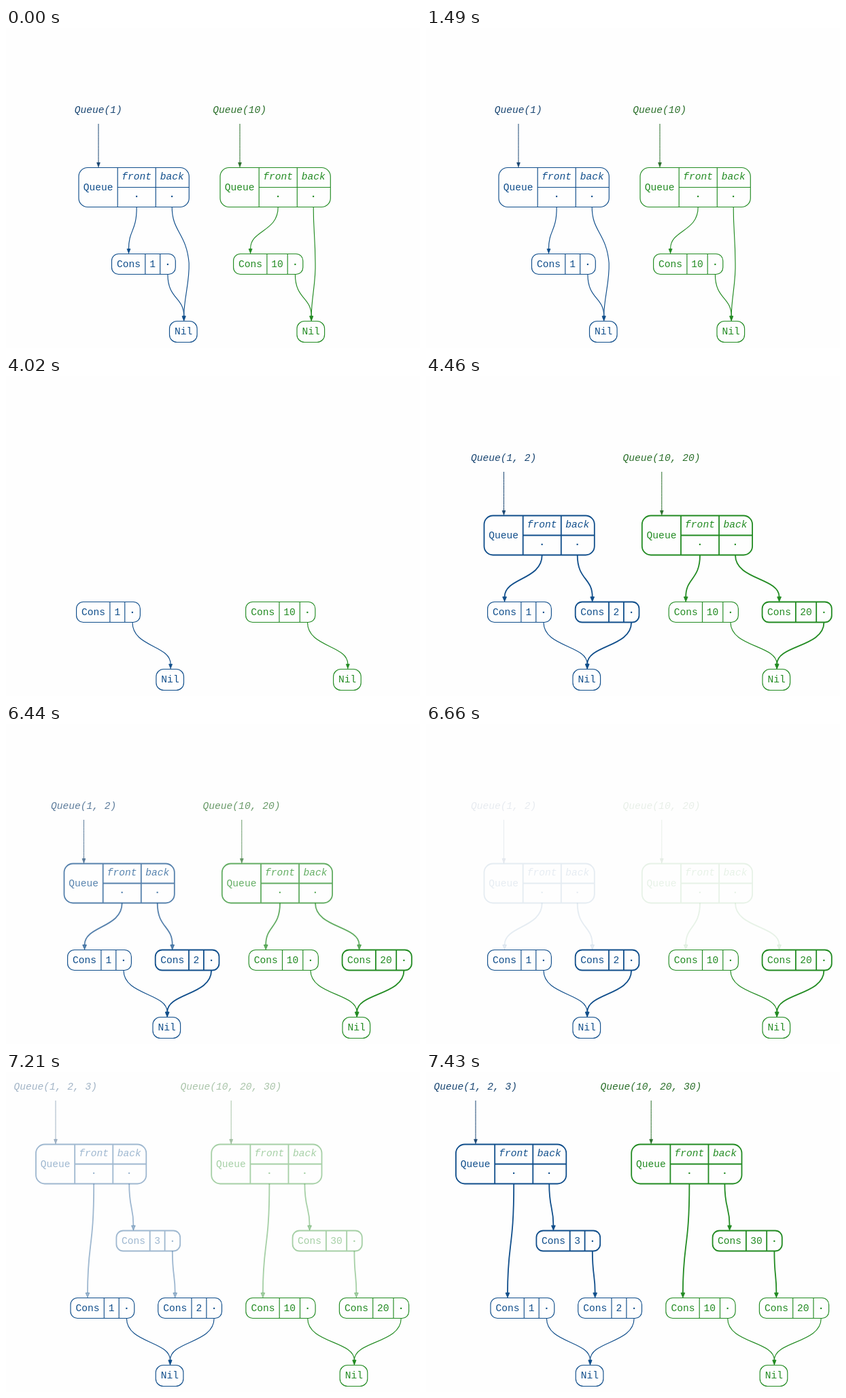
Write an HTML page with a canvas that moves like this. It is 609x471 px and loops after 8 s.

```html
<!DOCTYPE html>
<html lang="en">
<head>
<meta charset="utf-8">
<title>Queue diagram</title>
<style>
  html, body { margin: 0; height: 100%; overflow: hidden; background: #fefefe; }
  canvas { display: block; }
</style>
</head>
<body>
<canvas id="stage" width="609" height="471"></canvas>
<script>
const ctx = document.getElementById("stage").getContext("2d");
const THIN = 1.15, BOLD = 1.8;
const LOOP = 8000, STARTS = [3470, 6440], STEP = 110;
const QUEUE_TOPS = [205.5, 205.5, 106.5];

// Left edges of every box in the three successive layouts.
const graphs = [
  { color: "#104e8b", labelColor: "#1a4672", unit: 1, layouts: [
    { queue: 107, nil: 240.5, cons: [155.5] },
    { queue: 85.5, nil: 216, cons: [90.6, 219.7] },
    { queue: 44, nil: 220.3, cons: [95, 223.7, 162.4] } ] },
  { color: "#228b22", labelColor: "#2a6f2a", unit: 10, layouts: [
    { queue: 315, nil: 428, cons: [334.6] },
    { queue: 317.8, nil: 495, cons: [357.2, 494.6] },
    { queue: 302.2, nil: 491.2, cons: [352.9, 490.4, 421.6] } ] }
];

const clamp = v => Math.max(0, Math.min(1, v));
const lerp = (a, b, t) => a + (b - a) * t;
const consTop = i => i < 2 ? 332.5 : 233.5;

function setColor(color) {
  ctx.strokeStyle = ctx.fillStyle = color;
}

function text(str, x, y, style = "") {
  ctx.font = `${style} 14.6px "Liberation Mono", monospace`;
  ctx.fillText(str, x, y);
}

const dot = (x, y) => text("·", x, y, "bold");

function box(x, y, w, h, r, lines = []) {
  ctx.beginPath();
  ctx.roundRect(x, y, w, h, r);
  for (const [x1, y1, x2, y2] of lines) {
    ctx.moveTo(x + x1, y + y1);
    ctx.lineTo(x + x2, y + y2);
  }
  ctx.stroke();
}

// Curve through groups of bezier points, ending in a downward arrowhead.
function arrow(x, y, ...curves) {
  const [endX, endY] = curves.at(-1).slice(-2);
  ctx.beginPath();
  ctx.moveTo(x, y);
  for (const c of curves) ctx.bezierCurveTo(...c);
  ctx.stroke();
  const half = 2 + ctx.lineWidth / 2;
  ctx.beginPath();
  ctx.moveTo(endX - half, endY);
  ctx.lineTo(endX + half, endY);
  ctx.lineTo(endX, endY + 7);
  ctx.closePath();
  ctx.fill();
  ctx.lineWidth /= 2;
  ctx.stroke();
  ctx.lineWidth *= 2;
}

function edge(x1, y1, x2, y2) {
  const end = y2 - 7.5, dy = end - y1;
  arrow(x1, y1, [x1, y1 + dy * 0.6, x2, end - dy * 0.46, x2, end]);
}

function drawCons(graph, i, x, nil, cons, width) {
  const y = consTop(i), wide = graph.unit > 1 ? 8.4 : 0;
  ctx.lineWidth = width;
  box(x, y, 93.8 + wide, 30, 10, [[49.3, 0, 49.3, 30], [71.2 + wide, 0, 71.2 + wide, 30]]);
  text("Cons", x + 25, y + 19.5);
  text((i + 1) * graph.unit, x + 60.2 + wide / 2, y + 19.5);
  dot(x + 82.4 + wide, y + 19.5);
  if (i < 2) edge(x + 82.4 + wide, y + 30, nil + 21.2, 431.5);
  else edge(x + 82.4 + wide, y + 30, cons[1] + 25, consTop(1));
}

function drawQueue(graph, index) {
  const { queue: x, nil, cons } = graph.layouts[index];
  const y = QUEUE_TOPS[index], bottom = y + 58, last = cons.length - 1;

  setColor(graph.labelColor);
  ctx.lineWidth = 1;
  text(`Queue(${cons.map((_, i) => (i + 1) * graph.unit).join(", ")})`, x + 28.7, y - 80.5, "italic");
  edge(x + 29, y - 64.5, x + 29, y);

  setColor(graph.color);
  ctx.lineWidth = index ? BOLD : THIN;
  box(x, y, 162.3, 58, 13, [[57.2, 0, 57.2, 58], [113.3, 0, 113.3, 58], [57.2, 29, 162.3, 29]]);
  text("Queue", x + 28.7, y + 33);
  text("front", x + 85.2, y + 17.5, "italic");
  text("back", x + 137.2, y + 17.5, "italic");
  dot(x + 85.2, y + 46.5);
  dot(x + 137.2, y + 46.5);

  edge(x + 85.2, bottom, cons[0] + 25, consTop(0));
  const back = x + 137.2;
  if (last) {
    edge(back, bottom, cons[last] + 25, consTop(last));
  } else {
    const end = nil + 21.2, bulge = Math.max(back, end) + (graph.unit > 1 ? 2.8 : 7.5);
    const bend = (bulge - back) * 0.85;
    arrow(back, bottom,
      [back, 300, back + bend, 302, bulge, 346],
      [bulge + 1, 374, end, 398, end, 424]);
  }
}

function drawGraph(graph, index, progress) {
  const from = graph.layouts[index], to = graph.layouts[index + 1];
  const move = clamp(3 * progress - 1);
  const nil = lerp(from.nil, to.nil, move);

  ctx.globalAlpha = 1;
  setColor(graph.color);
  from.cons.forEach((x, i) => {
    const width = index && i === index ? lerp(BOLD, THIN, move) : THIN;
    drawCons(graph, i, lerp(x, to.cons[i], move), nil, from.cons, width);
  });
  ctx.lineWidth = THIN;
  box(nil, 431.5, 40.6, 31, 11);
  text("Nil", nil + 20.6, 451);

  const leaving = clamp(1 - 3 * progress), entering = clamp(3 * progress - 2);
  if (leaving) {
    ctx.globalAlpha = leaving;
    drawQueue(graph, index);
  }
  if (entering) {
    ctx.globalAlpha = entering;
    drawCons(graph, index + 1, to.cons[index + 1], to.nil, to.cons, BOLD);
    drawQueue(graph, index + 1);
  }
}

function render() {
  const t = performance.now() % LOOP;
  const index = t < STARTS[1] ? 0 : 1;
  const progress = clamp((Math.floor((t - STARTS[index]) / STEP) + 1) / 10);
  ctx.globalAlpha = 1;
  ctx.fillStyle = "#fefefe";
  ctx.fillRect(0, 0, 609, 471);
  ctx.textAlign = "center";
  for (const graph of graphs) drawGraph(graph, index, progress);
  requestAnimationFrame(render);
}
render();
</script>
</body>
</html>
```
